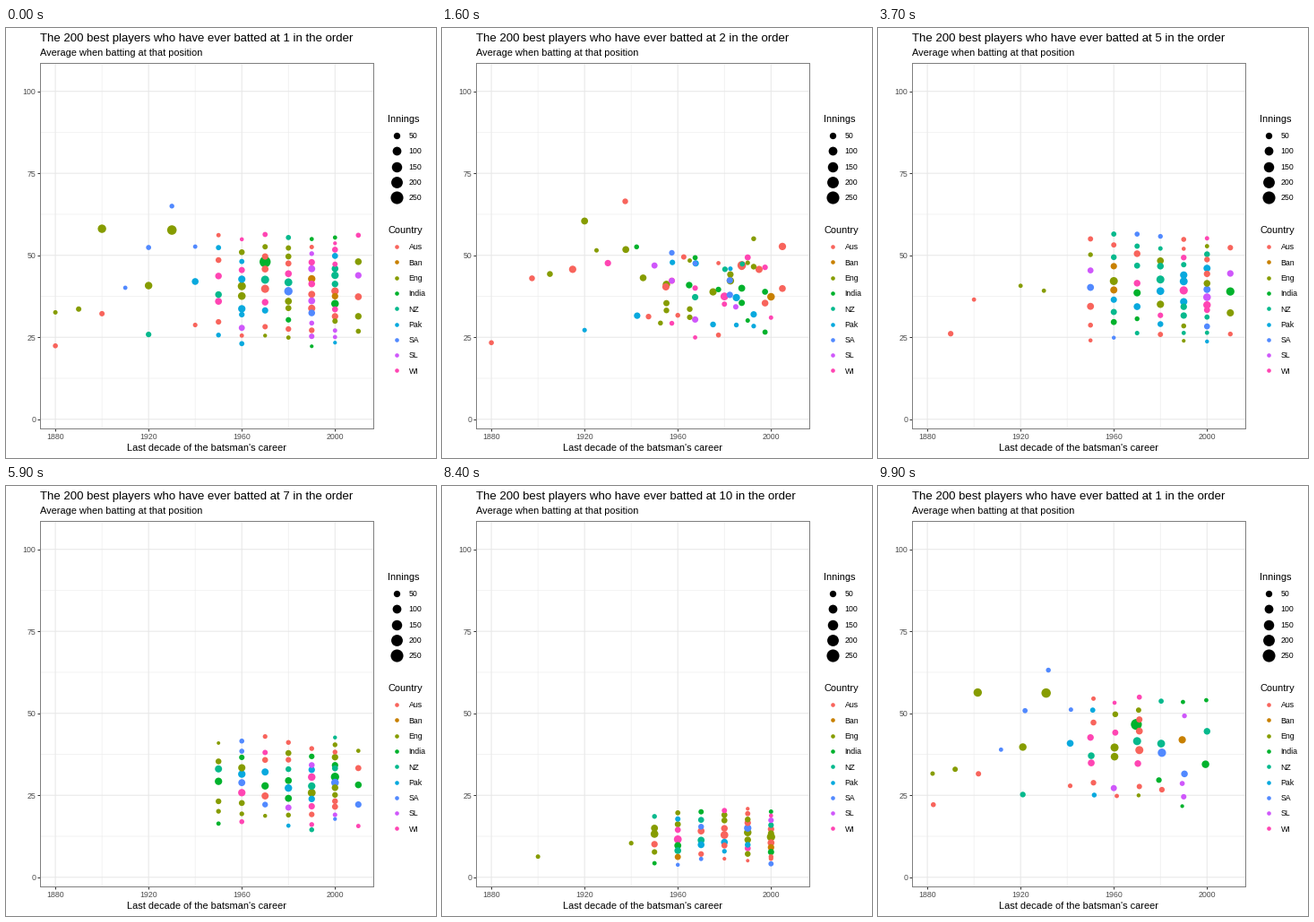
Write a matplotlib script that moves like this. It is 480 px wide and 480 px high and loops after 10000 ms.

```python
import random

import matplotlib.pyplot as plt
from matplotlib.animation import FuncAnimation

COLORS = {
    "Aus": "#f8645c", "Ban": "#c88000", "Eng": "#869c00",
    "India": "#00b22c", "NZ": "#06b98d", "Pak": "#08a9de",
    "SA": "#5189ff", "SL": "#cf57fb", "WI": "#ff45b3",
}
WEIGHTS = [16, 2, 18, 10, 8, 8, 7, 5, 10]
FRAMES, STATES, MOVE = 100, 11, 5

# dots per decade at the top of the order
COLUMNS = {1920: 3, 1940: 3, 1950: 8, 1960: 12, 1970: 10,
           1980: 12, 1990: 15, 2000: 17, 2010: 6}

# players who stand apart from the cloud: country, year, average, radius
STARS = {
    1: [("Aus", 1880, 22.4, 2.8), ("Eng", 1880, 32.6, 2.5),
        ("Eng", 1890, 33.6, 3), ("Eng", 1900, 58.1, 4.7),
        ("Aus", 1900, 32.2, 3), ("SA", 1910, 40.1, 2.4),
        ("SA", 1930, 65, 2.7), ("Eng", 1930, 57.7, 5.3),
        ("India", 1970, 48, 6.2)],
    2: [("Aus", 1880, 22.4, 2.8), ("Aus", 1900, 43.6, 3),
        ("Eng", 1900, 33.8, 3.1), ("Eng", 1920, 64.2, 4.1),
        ("Eng", 1930, 43, 4), ("WI", 1930, 39.5, 3.8),
        ("Aus", 1990, 52, 5.5), ("Aus", 2010, 58.4, 4.3)],
    3: [("Aus", 1880, 26.1, 2.8), ("Aus", 1890, 41.2, 4),
        ("Aus", 1900, 59.3, 2.7), ("Eng", 1920, 74.8, 3.8),
        ("Aus", 1930, 103.6, 4), ("WI", 1930, 71.2, 3),
        ("Eng", 1960, 77.2, 3.4), ("Aus", 1990, 55.2, 6.2),
        ("SL", 2000, 55.6, 6.2)],
    5: [("Aus", 1890, 26.1, 3.1), ("Aus", 1900, 36.5, 2.4),
        ("Eng", 1920, 40.7, 2.4), ("Eng", 1930, 39.2, 2.4)],
    8: [("Eng", 1880, 18.4, 1.8), ("Aus", 1920, 16.4, 2.8),
        ("Eng", 1940, 23.8, 3.5)],
    10: [("Eng", 1900, 6.3, 2.5), ("Eng", 1940, 10.4, 2.6)],
}
STARS[6] = STARS[5]


def make_state(pos):
    """Dots of one batting position by country: (year, average, radius)."""
    rng = random.Random(40 + pos)
    mid = 40 - 5.6 * max(0, pos - 5)
    half = 5 + 0.3 * mid
    rows = list(STARS.get(pos, []))
    for year, count in COLUMNS.items():
        if (year < 1950 and pos > 4) or (year == 2010 and pos > 9):
            continue
        n = round(count * (1 - 0.025 * pos))
        shift = rng.gauss(0, 1)
        column = []
        for k in range(n):
            z = (2 * k + 1) / n - 1 + rng.uniform(-0.6, 0.6) / n
            avg = max(mid + shift + half * z, 1.9)
            r = 2.2 + 2 * (1 - abs(z)) + rng.uniform(-0.4, 0.6)
            country = rng.choices(list(COLORS), WEIGHTS)[0]
            column.append((country, year, avg, max(r, 1.8)))
        rng.shuffle(column)
        rows += column
    rows.sort(key=lambda row: row[1])
    return {c: [row[1:] for row in rows if row[0] == c] for c in COLORS}


states = [make_state(pos) for pos in range(1, STATES + 1)]

plt.rcParams["font.family"] = "Liberation Sans"
fig = plt.figure(figsize=(480 / 72, 480 / 72), dpi=72, facecolor="white")

ax = fig.add_axes([38.2 / 480, 32.8 / 480, 372 / 480, 408 / 480])
ax.set(xlim=(1873.5, 2016.5), ylim=(-2.85, 108.6),
       xticks=range(1880, 2001, 40), yticks=range(0, 101, 25))
ax.set_xticks(range(1900, 1981, 40), minor=True)
ax.set_yticks([12.5, 37.5, 62.5, 87.5], minor=True)
ax.set_axisbelow(True)
ax.grid(which="major", color="#e8e8e8", lw=1.07, snap=False)
ax.grid(which="minor", color="#ebebeb", lw=0.6, snap=False)
ax.tick_params(which="minor", length=0)
ax.tick_params(which="major", length=2.74, width=1, pad=2.2, color="#333333",
               labelsize=8.8, labelcolor="#4d4d4d")
for spine in ax.spines.values():
    spine.set(color="#7f7f7f", linewidth=1)

page = fig.add_axes([0, 0, 1, 1])
page.set(xlim=(0, 480), ylim=(480, 0))
page.axis("off")


def label(x, y, text, size, ha="left"):
    return page.text(x, y, text, size=size, ha=ha, va="baseline", color="black")


def key(y, r, color, text):
    page.scatter([435.5], [y], s=[4 * r * r], c=[color], linewidths=0)
    label(449.5, y + 3.2, text, 8.8)


title = label(38, 15, "", 13.2)
label(38, 31, "Average when batting at that position", 11)
label(224.3, 471.5, "Last decade of the batsman's career", 11, "center")
label(426.2, 105, "Innings", 11)
label(426.5, 229, "Country", 11)
for i in range(5):
    innings = 50 * (i + 1)
    key(120 + 17.28 * i, 1.77 + 5.33 * ((innings - 20) / 235) ** 0.5,
        "black", str(innings))
for i, (name, color) in enumerate(COLORS.items()):
    key(244.2 + 17.28 * i, 2.3, color, name)

dots = ax.scatter([], [], linewidths=0, zorder=3)


def begin(i):
    """Frame on which state i has fully arrived."""
    return 9 * i + (i > 1)


def ease(t):
    return 4 * t ** 3 if t < 0.5 else 1 - 4 * (1 - t) ** 3


def blend(a, b, t):
    return tuple(p + (q - p) * t for p, q in zip(a, b))


def draw(frame):
    i = max(n for n in range(STATES) if begin(n) <= frame)
    j = (i + 1) % STATES
    step = max(0, frame - begin(i + 1) + MOVE)
    t = ease(step / MOVE)
    shown = []
    for name, color in COLORS.items():
        here = states[i][name]
        if step:
            # unmatched dots vanish for the length of the move
            here = [blend(a, b, t) for a, b in zip(here, states[j][name])]
        shown += [(r, year, avg, color) for year, avg, r in here]
    shown.sort(key=lambda d: -d[0])
    dots.set_offsets([d[1:3] for d in shown])
    dots.set_sizes([4 * d[0] ** 2 for d in shown])
    dots.set_facecolor([d[3] for d in shown])
    pos = 1 + (j if t > 0.5 else i)
    title.set_text(f"The 200 best players who have ever batted at {pos} in the order")
    return dots, title


anim = FuncAnimation(fig, draw, frames=FRAMES, interval=100, repeat=True,
                     repeat_delay=0, blit=False)
plt.show()
```
